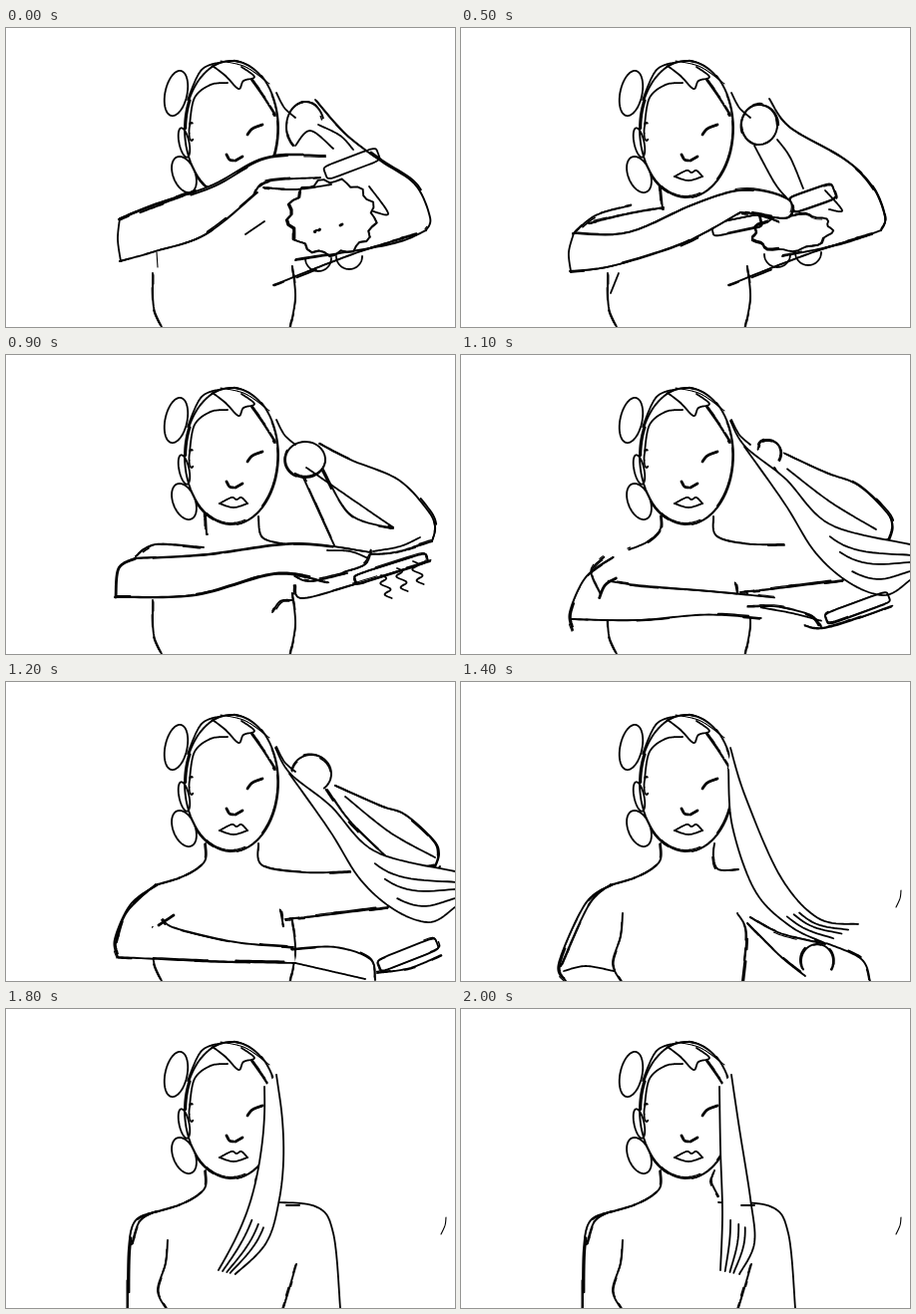
These frames come from a looping animation (450 by 300 pixels, 2.1 s). An HTML page with a canvas:

```html
<!DOCTYPE html>
<html lang="en">
<head>
<meta charset="utf-8">
<title>Brushing hair</title>
<style>
html, body { margin: 0; width: 100%; height: 100%; overflow: hidden; background: #fff; }
canvas { display: block; width: 450px; height: 300px; }
</style>
</head>
<body>
<canvas id="stage" width="450" height="300"></canvas>
<script>
const ctx = document.getElementById('stage').getContext('2d');
const SAMPLES = 48;
const range = n => Array.from({ length: n }, (_, i) => i);
const lerp = (a, b, k) => a + (b - a) * k;

const FINE = { width: 1.1 }, PLAIN = { width: 1.8 }, BOLD = { width: 2.8 };
const ROUGH = { width: 1.9, rough: true };

// Every stroke has the same number of points, so any two can be blended.
const plot = (pen, at) => ({ pen, pts: range(SAMPLES).map(n => at(n / (SAMPLES - 1))) });

// Smooth curve through a few key points
function curve(pen, ...xy) {
  const last = xy.length / 2 - 1;
  const key = (i, c) => xy[2 * Math.max(0, Math.min(last, i)) + c];
  return plot(pen, u => {
    const i = Math.min(last - 1, Math.floor(u * last)), f = u * last - i;
    return [0, 1].map(c => {
      const a = key(i - 1, c), p = key(i, c), q = key(i + 1, c), d = key(i + 2, c);
      return p + f / 2 * (q - a + f * (2 * a - 5 * p + 4 * q - d + f * (3 * (p - q) + d - a)));
    });
  });
}

// Angles in degrees, clockwise from the right
function oval(pen, x, y, rx, ry, { tilt = 0, from = 0, to = 360, bumps = 0, power = 1 } = {}) {
  const rad = Math.PI / 180, c = Math.cos(tilt * rad), s = Math.sin(tilt * rad);
  const shape = v => Math.sign(v) * Math.abs(v) ** power;
  return plot(pen, u => {
    const a = lerp(from, to, u) * rad, swell = 1 + .07 * Math.sin(bumps * a);
    const px = rx * swell * shape(Math.cos(a)), py = ry * swell * shape(Math.sin(a));
    return [x + px * c - py * s, y + px * s + py * c];
  });
}

function bar(pen, x0, y0, x1, y1, thick) {
  const tilt = Math.atan2(y1 - y0, x1 - x0) * 180 / Math.PI;
  return oval(pen, (x0 + x1) / 2, (y0 + y1) / 2, Math.hypot(x1 - x0, y1 - y0) / 2, thick / 2, { tilt, power: .3 });
}

const curl = (x, y) => plot(PLAIN, u => [x + 9 * u + 4 * Math.sin(u * 13), y + 23 * u]);
const loops = (x, y) => [0, 1].map(i => oval(PLAIN, x + 31 * i, y - 2 * i, 13, 13, { to: 180 }));

const head = [
  oval(PLAIN, 170.5, 65.5, 11, 23, { tilt: 12 }),
  oval(PLAIN, 178.5, 115, 5, 15, { tilt: -12 }),
  oval(PLAIN, 178.5, 147, 11, 19, { tilt: -22 }),
  oval(PLAIN, 186, 104, 2.5, 9, { from: 60, to: 290 }),
  oval(ROUGH, 226, 101, 47, 69, { from: -50, to: 180 }),
  oval(ROUGH, 226, 101, 47, 68, { from: 180, to: 310 }),
  curve(PLAIN, 182,72, 196,42, 217,34),
  curve(FINE, 215,33, 240,39, 264,56),
  curve(PLAIN, 184,97, 189,70, 205,57, 222,55),
  curve(PLAIN, 207,38, 220,48, 233,61, 238,53, 249,49, 236,39),
  curve(ROUGH, 246,52, 258,69, 270,88),
  curve(BOLD, 242,107, 247,101, 257,97),
  curve(BOLD, 221,127, 224,132, 228,133),
  curve(BOLD, 230,133, 237,129)
];
const mouth = [
  curve(PLAIN, 214,149, 226,143, 231,145, 236,143, 242,149),
  curve(PLAIN, 214,149, 228,153, 242,149)
];

const ribs = [curve(ROUGH, 147,246, 148,280, 156,300), curve(ROUGH, 287,240, 290,270, 285,300)];
const waist = curve(ROUGH, 162,232, 160,255, 152,282, 160,300);
const neck = curve(ROUGH, 200,162, 199,180, 180,194, 152,203);
const temple = curve(PLAIN, 271,65, 279,80, 290,90);
const forearm = curve(ROUGH, 412,207, 350,226, 268,258);
const stray = curve(FINE, 441,209, 440,217, 436,226);

// Strokes in the same position of a part turn into each other.
// The first two strokes of "arm" and "lock" are the edges of a white shape.
const poses = [
  {
    at: 0,
    body: [...ribs, curve(FINE, 151,225, 152,240), curve(FINE, 240,207, 259,194)],
    far: [
      oval(ROUGH, 300,99, 19,25, { from: 130, to: 340 }),
      curve(ROUGH, 310,72, 340,106, 375,133, 410,157, 425,190, 421,203),
      curve(ROUGH, 421,203, 385,217, 290,233),
      forearm,
      curve(PLAIN, 290,118, 305,103, 328,121),
      curve(ROUGH, 313,97, 335,108, 348,122),
      temple
    ],
    grip: [
      bar(PLAIN, 320,146, 373,126, 14),
      oval(ROUGH, 326,190, 43,37, { bumps: 13 }),
      ...loops(313, 231),
      curve(PLAIN, 364,159, 383,186, 368,184),
      curve(BOLD, 309,204, 315,202),
      curve(BOLD, 335,198, 337,197)
    ],
    arm: [
      curve(ROUGH, 113,192, 150,177, 206,158, 260,130, 320,128),
      curve(ROUGH, 114,234, 150,224, 200,207, 252,165),
      curve(ROUGH, 114,191, 112,212, 115,234),
      curve(ROUGH, 113,192, 140,181, 190,163),
      curve(BOLD, 248,168, 262,154, 315,150),
      curve(ROUGH, 258,160, 290,162, 326,157)
    ]
  },
  {
    at: 1,
    body: [...ribs, curve(FINE, 158,246, 150,266), curve(PLAIN, 200,160, 202,182)],
    far: [
      oval(ROUGH, 299,97, 18,20),
      curve(ROUGH, 309,71, 330,100, 385,132, 413,160, 425,190, 421,203),
      curve(ROUGH, 421,203, 380,217, 322,229),
      forearm,
      curve(PLAIN, 294,118, 314,155, 326,170),
      curve(PLAIN, 317,112, 330,130, 343,161),
      temple
    ],
    grip: [
      bar(PLAIN, 331,178, 374,163, 17),
      oval(ROUGH, 332,205, 39,18, { bumps: 9, tilt: -6 }),
      ...loops(317, 227),
      curve(PLAIN, 365,163, 382,183, 369,182),
      bar(ROUGH, 252,203, 300,193, 13)
    ],
    arm: [
      curve(ROUGH, 112,206, 168,205, 235,176, 285,162, 328,172, 328,190, 300,188),
      curve(ROUGH, 109,244, 150,239, 210,221, 245,205, 280,185),
      curve(PLAIN, 113,206, 108,225, 110,244),
      curve(ROUGH, 113,206, 135,188, 170,178),
      curve(ROUGH, 282,185, 302,188, 318,194),
      curve(ROUGH, 128,196, 165,187, 203,180)
    ]
  },
  {
    at: 5,
    body: [...ribs, curve(PLAIN, 200,160, 201,180), curve(ROUGH, 253,162, 257,183, 281,190)],
    far: [
      oval(ROUGH, 300,105, 20,18),
      curve(ROUGH, 314,89, 345,105, 393,125, 422,155, 430,172, 427,187),
      curve(ROUGH, 427,187, 390,198, 365,200),
      curve(ROUGH, 415,183, 395,192, 368,197),
      curve(PLAIN, 298,123, 308,145, 329,191),
      curve(PLAIN, 301,113, 340,140, 388,173),
      temple,
      curve(ROUGH, 318,115, 345,160, 388,174)
    ],
    grip: [
      bar(ROUGH, 350,226, 422,203, 10),
      curve(ROUGH, 290,231, 297,244, 350,230, 425,207),
      ...range(3).map(i => curl(376 + 16 * i, 221 - 7 * i)),
      curve(ROUGH, 322,222, 358,211, 366,196),
      curve(ROUGH, 267,258, 275,247, 287,246)
    ],
    arm: [
      curve(ROUGH, 129,204, 200,200, 290,189, 366,198),
      curve(ROUGH, 109,243, 190,241, 270,220, 322,228),
      curve(PLAIN, 130,204, 113,214, 110,243),
      curve(ROUGH, 130,202, 150,190, 198,193),
      curve(ROUGH, 290,222, 305,227, 342,219),
      curve(ROUGH, 322,196, 345,197, 363,204)
    ]
  },
  {
    at: 8,
    body: [
      ...ribs, neck,
      curve(ROUGH, 253,162, 257,184, 300,191, 345,190),
      curve(ROUGH, 152,203, 125,223, 109,258, 112,276),
      curve(ROUGH, 280,238, 310,235, 383,226),
      curve(ROUGH, 275,229, 278,245)
    ],
    far: [
      oval(ROUGH, 306,92, 20,19, { from: 190, to: 410 }),
      curve(ROUGH, 330,104, 375,124, 400,133, 428,158, 434,172, 430,186),
      curve(ROUGH, 430,184, 405,187, 384,178),
      curve(PLAIN, 435,185, 424,197, 405,205),
      curve(ROUGH, 322,108, 345,140, 384,178),
      curve(PLAIN, 340,115, 385,151, 430,176),
      temple
    ],
    lock: [
      curve(PLAIN, 270,66, 285,92, 325,124, 370,170, 450,190),
      curve(PLAIN, 284,92, 325,150, 355,198, 390,229, 425,241, 450,226)
    ],
    grip: [
      bar(ROUGH, 374,285, 432,262, 13),
      curve(ROUGH, 372,292, 405,287, 436,274)
    ],
    arm: [
      curve(ROUGH, 157,238, 170,247, 230,261, 288,266),
      curve(ROUGH, 112,276, 200,280, 290,282),
      curve(BOLD, 168,234, 153,244),
      curve(ROUGH, 150,203, 121,231, 110,262),
      curve(ROUGH, 286,268, 330,266, 365,278, 370,299),
      curve(PLAIN, 290,282, 325,290, 360,298)
    ]
  },
  {
    at: 10,
    body: [
      waist,
      curve(ROUGH, 277,232, 286,252, 282,300),
      neck,
      curve(ROUGH, 254,162, 253,175, 258,188, 278,188),
      curve(ROUGH, 152,203, 125,222, 98,282, 105,300),
      curve(ROUGH, 103,290, 125,285, 153,290),
      curve(ROUGH, 150,203, 128,224, 100,285),
      stray
    ],
    far: [
      oval(ROUGH, 357,280, 16,17, { from: 150, to: 390 }),
      curve(ROUGH, 355,258, 400,277, 410,300),
      curve(ROUGH, 287,242, 320,275, 345,295),
      curve(ROUGH, 290,236, 320,252, 365,263)
    ],
    lock: [
      curve(PLAIN, 270,66, 285,115, 320,195, 358,237, 398,243),
      curve(PLAIN, 268,88, 272,145, 295,210, 330,245, 365,262)
    ]
  },
  {
    at: 12,
    body: [
      waist,
      curve(ROUGH, 291,256, 284,280, 278,300),
      neck,
      curve(ROUGH, 254,162, 251,173, 258,188),
      curve(ROUGH, 152,203, 130,212, 123,240, 122,300),
      curve(PLAIN, 258,194, 310,198, 328,225, 335,300),
      curve(ROUGH, 150,203, 134,213, 126,236),
      stray
    ],
    lock: [
      curve(PLAIN, 271,66, 279,120, 290,190, 294,235, 279,266),
      curve(PLAIN, 259,78, 260,140, 262,205, 260,262)
    ]
  }
];
poses.push({ ...poses[5], at: 16, grip: [curve(PLAIN, 281,197, 294,197)] });

function blend(a, b, k) {
  return { pen: b.pen, pts: a.pts.map((p, n) => p.map((v, c) => lerp(v, b.pts[n][c], k))) };
}

function mix(a, b, k) {
  const near = k < .5 ? a : b;
  if (!a || !b) return near || [];
  return near.map((s, i) => a[i] && b[i] ? blend(a[i], b[i], k) : s);
}

function random(seed) {
  return () => {
    seed = (seed * 16807) % 2147483647;
    return seed / 2147483647;
  };
}

function trace(pts, width, dx = 0, dy = 0) {
  ctx.lineWidth = width;
  ctx.beginPath();
  pts.forEach(([x, y]) => ctx.lineTo(x + dx, y + dy));
  ctx.stroke();
}

// Rough strokes get short, slightly misplaced retraces.
function ink({ pen, pts }) {
  trace(pts, pen.width);
  if (!pen.rough) return;
  const rnd = random(1 + Math.floor(Math.abs(pts[0][0] * 977 + pts[0][1] * 131)));
  const shift = () => 3 * rnd() - 1.5;
  for (let i = 0; i < SAMPLES - 2;) {
    const size = 5 + Math.floor(rnd() * 12);
    if (rnd() < .75) trace(pts.slice(i, i + size), 1 + rnd(), shift(), shift());
    i += Math.ceil(size * .7);
  }
}

function fillBetween([a, b]) {
  ctx.beginPath();
  [...a.pts, ...b.pts.slice().reverse()].forEach(p => ctx.lineTo(...p));
  ctx.fill();
}

function drawShape(strokes) {
  if (!strokes.length) return;
  fillBetween(strokes);
  strokes.forEach(ink);
}

function bend({ pen, pts }, swing) {
  return { pen, pts: pts.map(([x, y]) => [x + swing * (Math.max(0, y - 90) / 170) ** 2, y]) };
}

// Strands lie between the two edges, near the tip.
function hairLock(edges, swing) {
  if (!edges.length) return [];
  const [a, b] = edges.map(s => bend(s, swing));
  const strands = [.3, .5, .75].map(k => {
    const { pts } = blend(a, b, k);
    return { pen: PLAIN, pts: pts.slice(32) };
  });
  return [a, b, ...strands];
}

function draw(step) {
  const i = Math.min(poses.length - 2, poses.findLastIndex(p => p.at <= step));
  const [from, to] = poses.slice(i, i + 2);
  const k = (step - from.at) / (to.at - from.at);
  const get = name => mix(from[name], to[name], k);
  const swing = step > 12 ? -46 * Math.sin(Math.PI * (step - 12) / 4) : 0;

  ctx.fillStyle = '#fff';
  ctx.fillRect(0, 0, 450, 300);
  ctx.strokeStyle = '#000';
  ctx.lineCap = ctx.lineJoin = 'round';
  [head, step ? mouth : [], get('body'), get('far')].flat().forEach(ink);
  drawShape(hairLock(get('lock'), swing));
  get('grip').forEach(ink);
  drawShape(get('arm'));
}

let shown = -1;
function tick() {
  const t = performance.now() % 2100;
  const step = t < 500 ? 0 : Math.floor((t - 500) / 100) + 1;
  if (step !== shown) draw(shown = step);
  requestAnimationFrame(tick);
}
tick();
</script>
</body>
</html>
```
